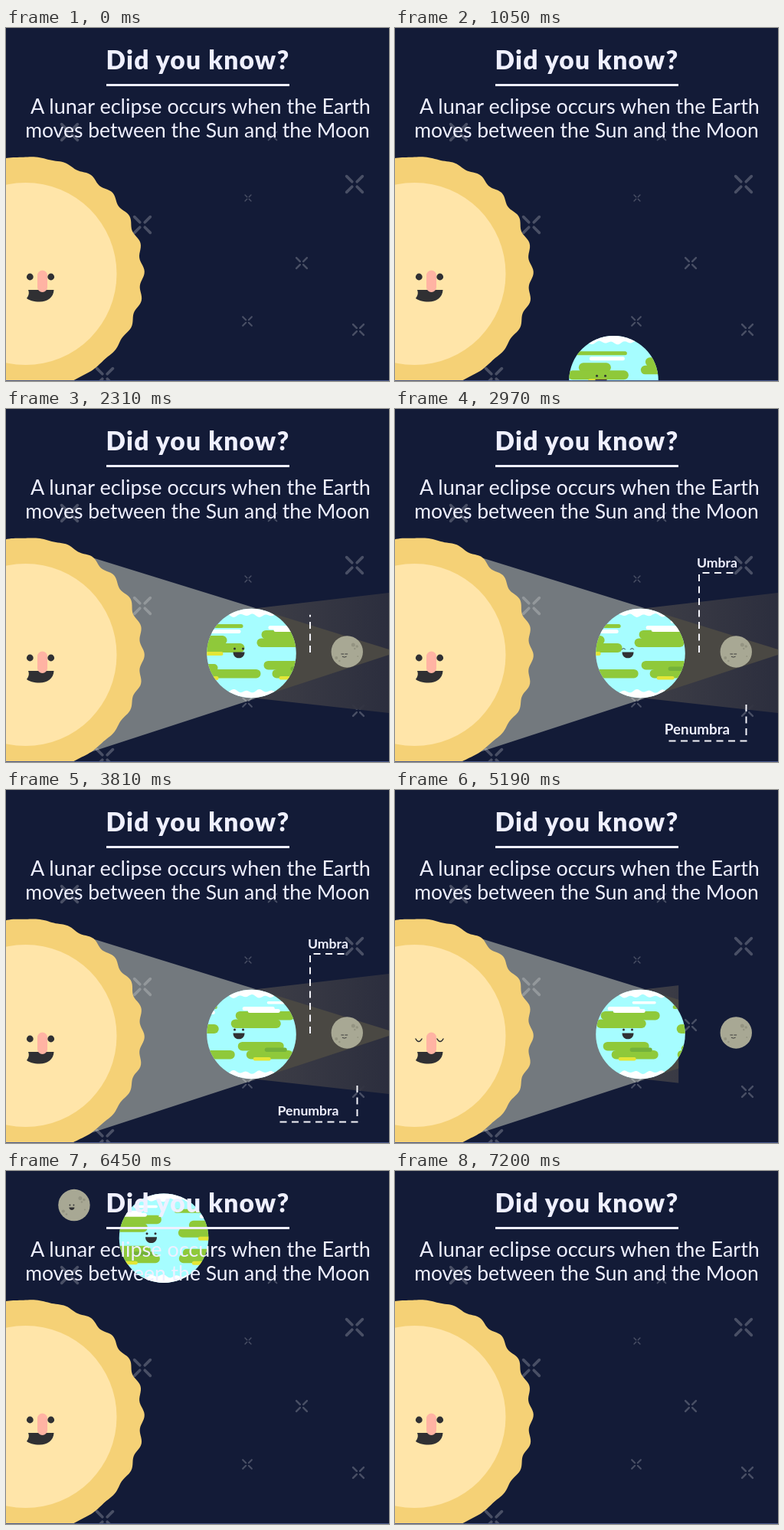
Write an HTML page that moves like this. It is 500 px wide and 461 px high and loops after 7.23 s.

```html
<!DOCTYPE html>
<html lang="en">
<head>
<meta charset="utf-8">
<title>Lunar eclipse</title>
<style>
  html, body { margin: 0; width: 100%; height: 100%; overflow: hidden; background: #131b37; }
  svg { display: block; width: 100vw; height: 100vh; }
  text { font-family: Lato, "Open Sans", sans-serif; fill: #eff0ff; text-anchor: middle; }
  .label { font-weight: 700; font-size: 17.6px; }
  .dash { fill: none; stroke: #f4f4fa; stroke-width: 2; stroke-dasharray: 9 6.5; }
  .lid { fill: none; stroke: #303033; stroke-linecap: round; }
</style>
</head>
<body>
<svg viewBox="0 0 500 461">
  <defs>
    <clipPath id="front"><rect id="frontRect" y="0" height="461"/></clipPath>
    <clipPath id="globe"><circle r="58.3"/></clipPath>
    <linearGradient id="shade">
      <stop offset="0" stop-color="#414148"/><stop offset="1" stop-color="#2d2f3e"/>
    </linearGradient>
  </defs>
  <rect width="500" height="461" fill="#131b37"/>
  <g clip-path="url(#front)"><path d="M80 184 L332 262 V376 L80 458Z" fill="#73797e"/></g>
  <g id="stars" stroke="#fff" stroke-opacity=".23" stroke-linecap="round"></g>
  <g clip-path="url(#front)">
    <path d="M320 261 L500 240 V397 L320 377Z" fill="url(#shade)" opacity=".94"/>
    <path d="M332 262 L500 314 V321 L332 376Z" fill="#4a4843"/>
  </g>

  <path id="corona" fill="#f5d176"/>
  <circle cx="25.5" cy="321" r="119" fill="#ffe5a9"/>
  <g id="sunFace">
    <g id="sunEyes" fill="#303033"><circle cx="31.3" cy="325" r="4.4"/><circle cx="58.7" cy="325" r="4.4"/></g>
    <path id="sunLids" class="lid" stroke-width="1.5" d="M27 325 q4 7 8 0 M55 325 q4 7 8 0"/>
    <path d="M29 342 H62.5 C62 352 54 357.5 44 357.5 C36 357.5 30 355.5 27 353 C30 349 30.5 346 29 342Z" fill="#303033"/>
    <rect x="41" y="316.5" width="13" height="28.5" rx="6.5" fill="#ffb3a3"/>
  </g>

  <g id="earth">
    <g clip-path="url(#globe)">
      <circle r="59" fill="#a6fdff"/>
      <g id="land"></g>
    </g>
    <g fill="#303033">
      <g id="earthEyes"><circle cx="-22" cy="-6" r="1.5"/><circle cx="-11" cy="-6" r="1.5"/></g>
      <path d="M-24 -1.5 H-9 C-9 9 -24 9 -24 -1.5Z"/>
    </g>
    <path id="earthLids" class="lid" d="M-24 -5 q2 -3 4 0 M-13 -5 q2 -3 4 0"/>
  </g>

  <g id="moon">
    <circle id="moonDisc" r="20.7"/>
    <g fill="#80806f" opacity=".5">
      <circle cx="8" cy="-9" r="2.5"/><circle cx="13" cy="-7" r="1.8"/><circle cx="10" cy="-4" r="1.3"/>
      <circle cx="-14" cy="8" r="2"/><circle cx="-10" cy="12" r="1.3"/><circle cx="14" cy="6" r="1"/>
    </g>
    <g id="moonAwake" fill="#303033">
      <circle cx="-5.5" cy="0" r=".9"/><circle cx="-.5" cy="0" r=".9"/>
      <path d="M-6.5 3 H.5 C.5 7.5 -6.5 7.5 -6.5 3Z"/>
    </g>
    <path id="moonAsleep" class="lid" stroke-width=".9" d="M-7.5 3 h3 M-2.5 3 h3 M-6 6.5 q2.5 1.5 5 0"/>
  </g>

  <path id="umbraLine" class="dash"/>
  <path id="penumbraLine" class="dash"/>
  <g id="umbraText"><text class="label" y="6.5">Umbra</text></g>
  <g id="penumbraText"><text class="label" y="6.5">Penumbra</text></g>

  <text x="250.5" y="54" font-size="33.5" font-weight="900" letter-spacing="1.2">Did you know?</text>
  <rect x="131" y="73" width="239" height="3" fill="#eff0ff"/>
  <text x="254" y="112" font-size="27">A lunar eclipse occurs when the Earth</text>
  <text x="250" y="143" font-size="26.5">moves between the Sun and the Moon</text>
  <rect y="460" width="500" height="1" fill="#4a5a8c"/>
</svg>
<script>
const LOOP = 7230, RAD = Math.PI / 180;
const $ = id => document.getElementById(id);
const set = (id, name, value) => $(id).setAttribute(name, value);
const show = (id, on) => set(id, 'visibility', on ? 'visible' : 'hidden');
const ramp = (t, a, b) => Math.min(1, Math.max(0, (t - a) / (b - a)));
const within = (t, a, b) => t >= a && t < b;

// Stars: x, y, half size
$('stars').innerHTML = [
  [83, 136, 11.5], [348, 141, 6], [178, 257, 11.5], [455, 204, 11.5], [316, 222, 4.4],
  [386, 307, 7.7], [315, 383, 6.5], [460, 394, 7.7], [129, 455, 11.5]
].map(([x, y, r]) => {
  const a = r * .28, b = r * .9;
  const arms = [[1, 1], [1, -1], [-1, 1], [-1, -1]]
    .map(([i, j]) => `M${x + i * a} ${y + j * a}L${x + i * b} ${y + j * b}`).join('');
  return `<path d="${arms}" stroke-width="${r * .32}"/>`;
}).join('');

// Land and clouds: left, right, top, height
const bands = {
  '#8fc93a': [
    [-41, 41, -38, 5], [-22, 20, -23, 12], [-36, 43, -13, 12], [-35, 64, 21, 11.5], [-30, 8, 14, 10],
    [65, 142, -30, 11.5], [59, 124, -19.5, 11.5], [68, 128, 10, 11.5], [79, 140, 21, 11.5]
  ],
  '#74b23a': [[103, 132, 17.5, 5.5]],
  '#e3e636': [[-10, 15, -2, 5], [-18, 9, 30, 5], [88, 111, 30, 4.5]],
  '#ffffff': [[-8, 38, -31, 5], [74, 116, -36, 5], [81, 123, -33, 5], [106, 137, -43, 3.5]]
};
let land = '';
for (const shift of [0, 200])
  for (const [color, list] of Object.entries(bands))
    for (const [l, r, y, h] of list)
      land += `<rect x="${l + shift}" y="${y}" width="${r - l}" height="${h}" rx="${h / 2}" fill="${color}"/>`;
for (const side of [-1, 1]) {
  let cap = `M-80 ${side * 62}`;
  for (let x = -80; x <= 260; x += 2)
    cap += `L${x} ${side * (49.5 + 1.6 * Math.sin(x * .38) + Math.sin(x * .17))}`;
  land += `<path d="${cap}L260 ${side * 62}Z" fill="#fff"/>`;
}
$('land').innerHTML = land;

function corona(t) {
  const drift = 1.5 * Math.sin(Math.PI * t / LOOP) ** 2;
  let d = '';
  // The waves calm down towards the top and, sooner, towards the bottom
  for (let a = -115; a <= 115; a += 1) {
    const calm = Math.max(ramp(a, 50, 82), ramp(-a, 18, 50));
    const r = 152.7 + (2.6 - 2.2 * calm) * Math.cos(360 / 14 * (a - 1 + drift) * RAD);
    d += `${d ? 'L' : 'M'}${(25.5 + r * Math.cos(a * RAD)).toFixed(2)} ${(321 - r * Math.sin(a * RAD)).toFixed(2)}`;
  }
  return d + 'Z';
}

// Orbit angles in degrees, time in seconds
function earthAngle(s) {
  if (s < 1.73) return .4 - 62 * (1.73 - s) ** 2;
  if (s < 5.43) return .4;
  if (s < 5.97) return .4 + 59.5 * (s - 5.43) ** 2;
  return 17.75 + 66 * (s - 5.97) + 12 * (s - 5.97) ** 2;
}
function moonAngle(s) {
  if (s < 2.28) return .9 - 84 * (2.28 - s) ** 2;
  if (s < 5.25) return .9;
  if (s < 5.97) return .9 + 148.7 * (s - 5.25) ** 2;
  return 78 + 170 * (s - 5.97);
}
const orbit = ([x, y], r, a) => [x + r * Math.cos(a * RAD), y - r * Math.sin(a * RAD)];

function lightFront(t) {
  return t < 3500 ? 90 + 410 * ramp(t, 1420, 1985) : 500 - 410 * ramp(t, 5020, 5560);
}

// Draws part k of a line with one corner
function bend(id, points, k) {
  const [[x0, y0], [x1, y1], [x2, y2]] = points;
  const first = Math.hypot(x1 - x0, y1 - y0), second = Math.hypot(x2 - x1, y2 - y1);
  const p = Math.min(1, k * (first + second) / first);
  const q = Math.max(0, (k * (first + second) - first) / second);
  let d = `M${x0} ${y0}L${x0 + (x1 - x0) * p} ${y0 + (y1 - y0) * p}`;
  if (q > 0) d += `L${x1 + (x2 - x1) * q} ${y1 + (y2 - y1) * q}`;
  set(id, 'd', d);
  show(id, k > 0);
}

function pop(id, x, y, t, start, end) {
  const k = ramp(t, start, start + 300);
  const grow = 1 + 2.4 * (k - 1) ** 3 + 1.4 * (k - 1) ** 2;
  const scale = grow * (1 - ramp(t, end, end + 200) ** 2);
  set(id, 'transform', `translate(${x} ${y}) scale(${Math.max(0, scale)})`);
  show(id, scale > 0 && t > start);
}

function eyes(name, closed) {
  show(name + 'Eyes', !closed);
  show(name + 'Lids', closed);
}

function draw(t) {
  const s = t / 1000;
  set('corona', 'd', corona(t));
  set('sunFace', 'transform', `translate(0 ${-1.7 * Math.sin(Math.PI * ramp(t, 1200, 2100))})`);
  eyes('sun', within(t, 5100, 5280));

  const earth = orbit([25.5, 321], 295, earthAngle(s));
  const moon = orbit(earth, 124.8, moonAngle(s));
  set('earth', 'transform', `translate(${earth})`);
  set('land', 'transform', `translate(${-.0225 * t} 0)`);
  eyes('earth', within(t, 2890, 3070));

  const dim = ramp(t, 1900, 2300);
  const tone = (a, b) => Math.round(a + (b - a) * dim);
  set('moon', 'transform', `translate(${moon})`);
  set('moonDisc', 'fill', `rgb(${tone(227, 168)},${tone(226, 168)},${tone(217, 148)})`);
  const asleep = within(t, 2300, 5400);
  show('moonAwake', !asleep);
  show('moonAsleep', asleep);

  set('frontRect', 'width', lightFront(t));

  const leave = 1 - ramp(t, 4640, 4940);
  bend('umbraLine', [[397, 318], [397, 214], [448, 214]], ramp(t, 2200, 2550) * leave);
  bend('penumbraLine', [[458.5, 386], [458.5, 433.5], [355, 433.5]], ramp(t, 2480, 2830) * leave);
  pop('umbraText', 420.5, 200, t, 2450, 4640);
  pop('penumbraText', 394.5, 418.5, t, 2780, 4640);
}

function tick() {
  draw(performance.now() % LOOP);
  requestAnimationFrame(tick);
}
tick();
</script>
</body>
</html>
```
